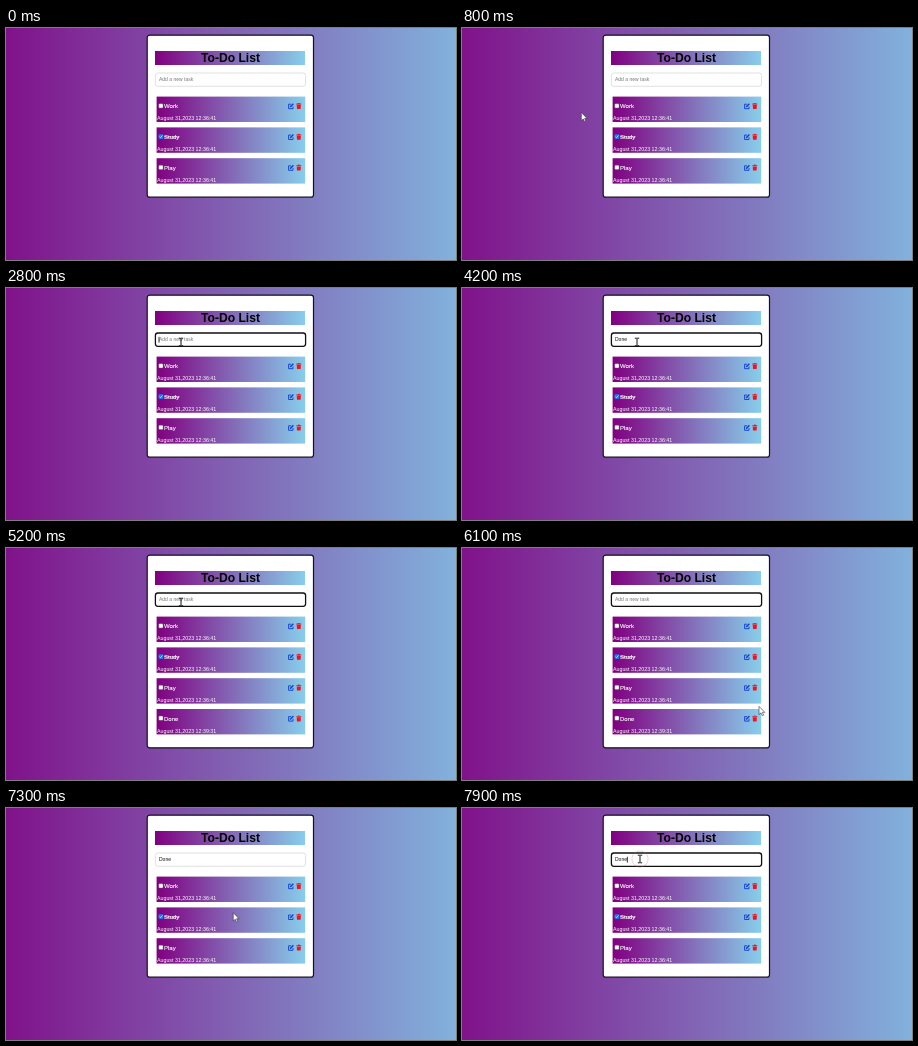
Write an HTML page that moves like this. It is 450 by 232 pixels and loops after 8000 ms.

```html
<!DOCTYPE html>
<html lang="en">
<head>
<meta charset="utf-8">
<title>To-Do List</title>
<style>
  html, body { margin: 0; width: 100%; height: 100%; overflow: hidden; }
  svg { display: block; width: 450px; height: 232px; font-family: "Liberation Sans", Arial, sans-serif; }
  .title { font-size: 12.1px; font-weight: bold; text-anchor: middle; }
  .field { font-size: 5px; }
  .task { font-size: 6px; fill: #fff; stroke: #fff; stroke-width: .12px; }
  .date { font-size: 5.3px; fill: #fff; }
</style>
</head>
<body>
<svg viewBox="0 0 450 232">
  <defs>
    <linearGradient id="page">
      <stop stop-color="#80128a"/><stop offset="1" stop-color="#82b1dc"/>
    </linearGradient>
    <linearGradient id="bar">
      <stop stop-color="#800080"/><stop offset="1" stop-color="#87ceeb"/>
    </linearGradient>
    <g id="edit" fill="none" stroke="#0a3fd0" stroke-width=".9">
      <path d="M3 1.2H.6V5.7H5V3.5"/>
      <path d="M2.1 4.1L5.4 .7" stroke-width="1.4"/>
    </g>
    <g id="bin" fill="#f5101c">
      <path d="M0 .6H1.5L1.9 0H3.1L3.5 .6H5V1.4H0Z"/>
      <path d="M.4 1.8H4.6L4.3 6H.7Z"/>
    </g>
  </defs>
  <rect width="450" height="232" fill="url(#page)"/>
  <rect id="card" x="141.2" y="7.2" width="166.3" height="162" rx="2.5" fill="#fff" stroke="#15101c" stroke-width="1.2"/>
  <rect x="149" y="23" width="150" height="14" fill="url(#bar)"/>
  <text class="title" x="224.5" y="34.4">To-Do List</text>
  <rect id="box" x="149.4" y="45" width="150.2" height="13.3" rx="2.5" fill="#fff"/>
  <text id="field" class="field" x="153" y="53.4"></text>
  <path id="caret" stroke="#000" stroke-width=".8"/>
  <g id="list"></g>
  <circle id="ring" fill="none" stroke="#d0506a" stroke-width=".9"/>
  <path id="arrow" d="M0 0V8.2L2 6.5L3.3 9.4L4.6 8.8L3.3 6H5.8Z" fill="#fff" stroke="#333" stroke-width=".6"/>
  <path id="beam" d="M-2.2 -3.8H-.6L0 -3.3L.6 -3.8H2.2M0 -3.3V3.3M-2.2 3.8H-.6L0 3.3L.6 3.8H2.2" fill="none" stroke="#111" stroke-width="1"/>
</svg>
<script>
const LOOP = 8000, BLINK = 530, RING = 350;
const FOCUS = 1680, ADD = 4500, EDIT = 6550, REFOCUS = 7720;
const WORD = "Done", TYPE_START = 3150, TYPE_STEP = 150;
const $ = id => document.getElementById(id);

const tasks = [["Work", "36:41"], ["Study", "36:41", true], ["Play", "36:41"], [WORD, "39:31"]];

// Pointer stops: time, x, y
const path = [
  [500, -6, 120], [900, 142, 78], [1450, 174, 54], [1800, 175, 54],
  [5500, 175, 54], [5950, 305, 150], [6300, 285, 171],
  [6560, 285, 171], [6700, 280, 163], [7000, 277, 159], [7600, 178, 51], [8000, 178, 51]
];

// Clicks: time, x, y
const clicks = [[FOCUS, 174, 54], [EDIT, 285, 171], [REFOCUS - 60, 178, 51]];

function row([name, time, done], i) {
  const y = 68.6 + i * 30.8;
  const check = done
    ? `<rect x="152.6" y="6.9" width="4.6" height="4.6" rx=".8" fill="#1a78f0"/>
       <path d="M153.5 9.2L154.6 10.3L156.4 8" fill="none" stroke="#fff" stroke-width=".7"/>`
    : `<rect x="152.8" y="7.1" width="4.2" height="4.2" rx=".7" fill="#fff" stroke="#666" stroke-width=".4"/>`;
  const strike = done ? `<path d="M158 9.5H173.5" stroke="#fff" stroke-width=".6"/>` : "";
  return `<g transform="translate(0 ${y})">
    <rect x="150.6" width="148.6" height="25.4" fill="url(#bar)"/>${check}
    <text class="task" x="158" y="11.5">${name}</text>${strike}
    <text class="date" x="151" y="23.8">August 31,2023 12:${time}</text>
    <use href="#edit" x="282" y="6.4"/><use href="#bin" x="290.3" y="6.4"/></g>`;
}
$("list").innerHTML = tasks.map(row).join("");
const lastRow = $("list").lastElementChild;

function show(el, on) {
  el.style.display = on ? "" : "none";
}

function pointerAt(t) {
  const i = path.findIndex(p => p[0] > t);
  if (i < 1) return null;
  const [t0, x0, y0] = path[i - 1], [t1, x1, y1] = path[i];
  const p = (t - t0) / (t1 - t0), e = p * p * (3 - 2 * p);
  return [x0 + (x1 - x0) * e, y0 + (y1 - y0) * e];
}

function textAt(t) {
  if (t >= EDIT) return WORD;
  if (t < TYPE_START || t >= ADD) return "";
  return WORD.slice(0, 1 + Math.floor((t - TYPE_START) / TYPE_STEP));
}

// Each click or key restarts the caret's blink
function caretStart(t) {
  if (t >= REFOCUS) return REFOCUS;
  if (t >= ADD) return ADD;
  if (t < TYPE_START) return FOCUS;
  const key = Math.floor((t - TYPE_START) / TYPE_STEP);
  return TYPE_START + TYPE_STEP * Math.min(WORD.length - 1, key);
}

function draw(t) {
  const focused = t >= FOCUS && t < EDIT || t >= REFOCUS;
  const added = t >= ADD && t < EDIT;
  const text = textAt(t), field = $("field");

  show(lastRow, added);
  $("card").setAttribute("height", added ? 192.6 : 162);
  $("box").setAttribute("stroke", focused ? "#101010" : "#d9d9e0");
  $("box").setAttribute("stroke-width", focused ? 1.3 : .8);
  field.textContent = text || "Add a new task";
  field.setAttribute("fill", text ? "#111" : "#757575");

  const x = 153 + (text ? field.getComputedTextLength() + .4 : 0);
  $("caret").setAttribute("d", `M${x} 48.8V54.6`);
  show($("caret"), focused && (t - caretStart(t)) % (2 * BLINK) < BLINK);

  const pos = pointerAt(t);
  const inField = pos && pos[0] > 149 && pos[0] < 300 && pos[1] > 45 && pos[1] < 58;
  show($("beam"), inField);
  show($("arrow"), pos && !inField);
  if (pos) $(inField ? "beam" : "arrow").setAttribute("transform", `translate(${pos})`);

  const click = clicks.find(c => t >= c[0] && t < c[0] + RING);
  show($("ring"), click);
  if (click) {
    const p = (t - click[0]) / RING;
    $("ring").setAttribute("cx", click[1]);
    $("ring").setAttribute("cy", click[2]);
    $("ring").setAttribute("r", 4 + 6 * p);
    $("ring").setAttribute("opacity", 1 - p);
  }
}

const start = performance.now();
function tick() {
  draw((performance.now() - start) % LOOP);
  requestAnimationFrame(tick);
}
tick();
</script>
</body>
</html>
```
